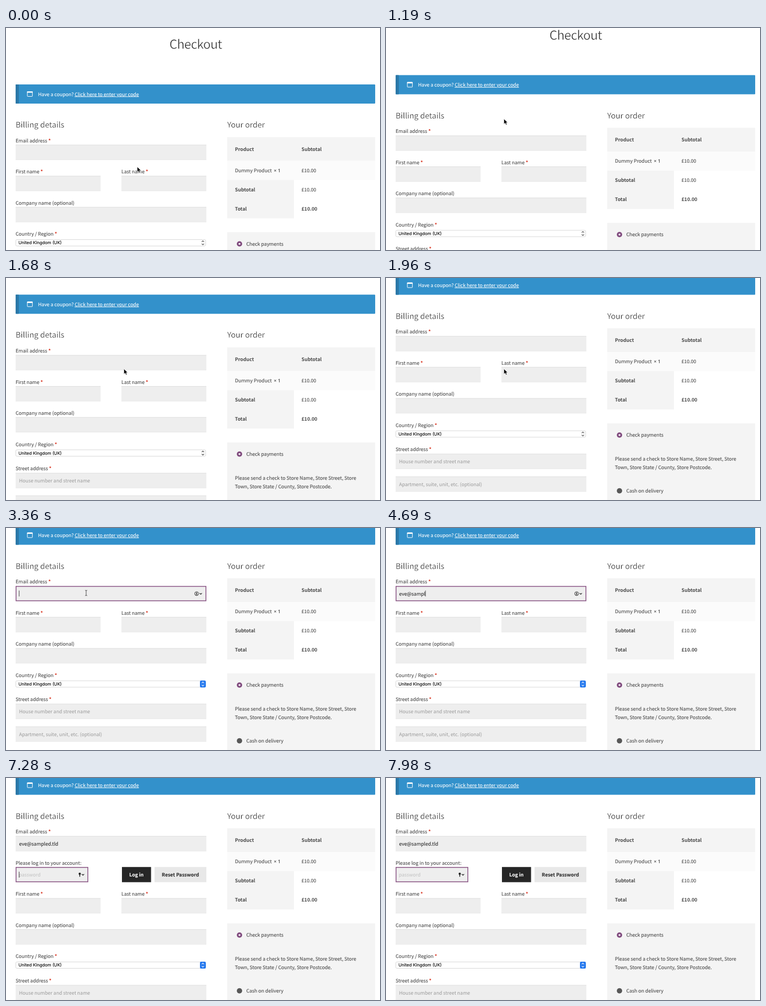
Write an HTML page that moves like this. It is 700 by 417 pixels and loops after 8 s.

```html
<!DOCTYPE html>
<html lang="en">
<head>
<meta charset="utf-8">
<title>Checkout</title>
<style>
  html, body { margin: 0; width: 100%; height: 100%; overflow: hidden; background: #fff; }
  svg { display: block; width: 100vw; height: 100vh; }
  text {
    font: 9.05px "Noto Sans CJK JP", "Noto Sans CJK SC", "Noto Sans CJK KR", "Noto Sans CJK", "Open Sans", sans-serif;
    fill: #4a4a4a; stroke: #4a4a4a; stroke-width: .1px;
    white-space: pre; text-rendering: geometricPrecision;
  }
  /* A white outline thins the regular weight to a light one. */
  .title, .heading { font-weight: 300; fill: #2c2c2c; stroke: #fff; }
  .title { font-size: 23.4px; letter-spacing: -.63px; stroke-width: .5px; }
  .heading { font-size: 14.5px; stroke-width: .32px; }
  .bold { font-weight: 600; stroke: none; }
  .white { fill: #fff; stroke: #fff; }
  .dark { fill: #2e2e2e; stroke: #2e2e2e; }
  .hint { fill: #999; stroke: none; }
  .pale { fill: #c0c0c0; stroke: none; }
  .required { fill: #d8301c; stroke: none; font-weight: 600; }
  .count { font-family: "Open Sans", sans-serif; font-size: 9px; }
  .system { font-family: Inter, "Liberation Sans", sans-serif; font-size: 8.1px; fill: #000; stroke: #000; }
  .focus { fill: none; stroke: #8a5585; stroke-width: 1.5; }
</style>
</head>
<body>
<svg id="stage" viewBox="0 0 700 417"></svg>
<script>
const DURATION = 8000, STEP = 70;
const FOCUS_EMAIL = 2870, FOCUS_NAME = 5740, FOCUS_PASSWORD = 7000;
const EMAIL = "eve@sampled.tld";
const KEY_TIMES = [3500, 3640, 3780, 4060, 4200, 4270, 4480, 4550, 4620, 4830, 4900, 5040, 5110, 5250, 5390];
const SCROLL = [[1050, 0], [1190, 17.5], [1680, 74.7], [1960, 110.5]];
const LOGIN_HEIGHT = 58.5, FIELD_HEIGHT = 28.5;

const rect = (x, y, w, h, fill, extra = "") =>
  `<rect x="${x}" y="${y}" width="${w}" height="${h}" fill="${fill}" ${extra}/>`;
const text = (x, y, content, cls = "", extra = "") =>
  `<text x="${x}" y="${y}" class="${cls}" ${extra}>${content}</text>`;
const label = (x, y, content) =>
  text(x, y, `${content} <tspan class="required">*</tspan>`);
const field = (x, y, w) =>
  rect(x, y, w, FIELD_HEIGHT, "#eee") + rect(x, y, w, .8, "#dcdcdc") +
  rect(x, y + FIELD_HEIGHT - .5, w, .5, "#e2e2e2");
const focusRing = (x, y, w) =>
  `<rect x="${x + .75}" y="${y + .75}" width="${w - 1.5}" height="${FIELD_HEIGHT - 1.5}" class="focus"/>`;
const button = (x, w, fill, caption, cls) =>
  rect(x, 277.7, w, FIELD_HEIGHT, fill) +
  text(x + w / 2, 295.5, caption, `bold ${cls}`, 'text-anchor="middle"');
const chevron = (x, y) =>
  `<path d="M${x - 2.2} ${y - 1}l2.2 2.2 2.2-2.2" fill="none" stroke="#222" stroke-width="1.2"/>`;
const personIcon = (x, y) => `
  <circle cx="${x}" cy="${y}" r="3.6" fill="none" stroke="#222" stroke-width=".9"/>
  <circle cx="${x}" cy="${y - .9}" r="1.2" fill="#222"/>
  <path d="M${x - 2.1} ${y + 2.1}q2.1-2.4 4.2 0z" fill="#222"/>${chevron(x + 7.7, y)}`;
const keyIcon = (x, y) => `
  <circle cx="${x}" cy="${y - 1.6}" r="2.1" fill="#222"/>
  ${rect(x - .7, y, 1.5, 4, "#222")}${chevron(x + 6, y)}`;
const arrows = color => `
  <path d="M366.4 401.9l2.1-2.2 2.1 2.2M366.4 405.1l2.1 2.2 2.1-2.2" fill="none" stroke="${color}" stroke-width="1.1"/>`;

const banner = `
  ${rect(18, 106, 673, 36, "#3391cb", 'rx="1.3"')}
  ${rect(18, 106, 6, 36, "#2b78a8", 'rx="1"')}
  <rect x="40" y="119.5" width="9.4" height="9" fill="none" stroke="#fff" rx=".6"/>
  ${rect(39.5, 119, 10.4, 2.6, "#fff", 'rx=".6"')}
  ${text(60, 127.5, "Have a coupon?", "white")}
  ${text(128.5, 127.5, "Click here to enter your code", "white", 'text-decoration="underline"')}`;

const loginRow = `
  <g clip-path="url(#loginClip)">
    ${text(18, 273.5, "Please log in to your account:")}
    ${field(18, 277.7, 136)}${text(24, 295.5, "password", "pale")}
    ${button(217, 54.5, "#262626", "Log in", "white")}
    ${button(278, 97, "#e8e8e8", "Reset Password", "dark")}
    <g id="passwordFocus">${focusRing(18, 277.7, 136)}${keyIcon(138, 292)}</g>
  </g>`;

const lowerForm = `
  <g id="lower">
    ${label(18, 273.4, "First name")}${field(18, 277.7, 159)}
    ${label(216, 273.4, "Last name")}${field(216, 277.7, 159)}
    <g id="nameFocus">${focusRing(18, 277.7, 159)}${personIcon(159, 292)}</g>
    ${text(18, 331.8, "Company name (optional)")}${field(18, 336.2, 357)}
    ${label(18, 390.3, "Country / Region")}
    ${rect(18.3, 397.5, 355.4, 12, "#fff", 'rx="2.2" stroke="#c8c8c8" stroke-width=".7"')}
    ${text(23.2, 406.3, "United Kingdom (UK)", "system")}
    <g id="selectIdle">${arrows("#444")}</g>
    <g id="selectActive">${rect(363, 397, 11, 13, "#2478ee", 'rx="2.2"')}${arrows("#fff")}</g>
    ${label(18, 435.9, "Street address")}
    ${field(18, 440.8, 357)}${text(24.5, 458.5, "House number and street name", "hint")}
    ${field(18, 483.3, 357)}${text(24.5, 501, "Apartment, suite, unit, etc. (optional)", "hint")}
  </g>`;

const order = `
  ${text(414, 187.2, "Your order", "heading")}
  ${rect(414, 205, 277, 44.5, "#f4f4f4")}
  ${rect(414, 249.5, 277, 36, "#fbfbfb")}
  ${rect(414, 285.5, 125, 72, "#f4f4f4")}
  ${text(428.5, 230.8, "Product", "bold")}${text(553, 230.8, "Subtotal", "bold")}
  ${text(428.5, 270.6, "Dummy Product")}${text(501.3, 270.6, "× 1", "bold count")}${text(553, 270.6, "£10.00")}
  ${text(428.5, 306.6, "Subtotal", "bold")}${text(553, 306.6, "£10.00")}
  ${text(428.5, 342.5, "Total", "bold")}${text(553, 342.5, "£10.00", "bold")}
  ${rect(414, 383.5, 277, 180, "#f4f4f4")}
  <circle cx="437" cy="405.5" r="5" fill="#814c7f"/><circle cx="437" cy="405.5" r="1.8" fill="#fff"/>
  ${text(449.7, 408.9, "Check payments")}
  ${text(428.5, 453.7, "Please send a check to Store Name, Store Street, Store")}
  ${text(428.5, 469.6, "Town, Store State / County, Store Postcode.")}
  <circle cx="437" cy="510.3" r="5" fill="#585858"/>
  ${text(449.7, 513.7, "Cash on delivery")}
  <g id="cover">${rect(413, 204, 279, 154, "#fff")}${rect(413, 383, 279, 181, "#fff")}</g>
  <g id="spinner">${Array.from({ length: 8 }, (_, i) =>
    `<circle cy="-8" r="1.9" fill="#777" opacity="${1 - i * .08}" transform="rotate(${-45 * i})"/>`).join("")}</g>`;

document.getElementById("stage").innerHTML = `
  <clipPath id="loginClip"><rect id="loginReveal" x="0" y="262" width="400" height="0"/></clipPath>
  <g id="page">
    ${text(355, 39.2, "Checkout", "title", 'text-anchor="middle"')}
    ${banner}
    ${text(18, 187.2, "Billing details", "heading")}
    ${label(18, 214.9, "Email address")}${field(18, 219.4, 357)}
    ${rect(18, 219.4, 1.5, FIELD_HEIGHT, "#1b8454", 'id="valid"')}
    <g id="emailFocus">${focusRing(18, 219.4, 357)}${personIcon(356.8, 233.8)}</g>
    ${text(24.5, 237.2, "", "dark", 'id="email"')}
    ${loginRow}${lowerForm}${order}
    ${rect(0, 0, .8, 11, "#222", 'id="caret"')}
  </g>
  <path id="pointer" d="M0 0V9.8L2.3 7.7 3.9 11.3 5.7 10.5 4.1 7H7.2Z" fill="#000" stroke="#fff" stroke-width=".7"/>
  <path id="beam" d="M-2-5Q0-5 0-4Q0-5 2-5M0-4V4M-2 5Q0 5 0 4Q0 5 2 5" fill="none" stroke="#222" stroke-width=".8"/>`;

const el = {};
document.querySelectorAll("#stage [id]").forEach(node => el[node.id] = node);

const clamp = v => Math.max(0, Math.min(1, v));
const ramp = (t, from, to) => clamp((t - from) / (to - from));
const ease = v => .5 - Math.cos(Math.PI * v) / 2;
const mix = (a, b, v) => a + (b - a) * v;
const show = (node, on) => node.setAttribute("visibility", on ? "visible" : "hidden");
const move = (node, x, y, extra = "") => node.setAttribute("transform", `translate(${x} ${y}) ${extra}`);

function along(keys, t) {
  if (t <= keys[0][0]) return keys[0][1];
  for (let i = 1; i < keys.length; i++) {
    const [t0, a] = keys[i - 1], [t1, b] = keys[i];
    if (t <= t1) return mix(a, b, ramp(t, t0, t1));
  }
  return keys[keys.length - 1][1];
}

function drawCaret(t, lastKey) {
  const inEmail = t < FOCUS_NAME, inPassword = t >= FOCUS_PASSWORD;
  const start = inEmail ? Math.max(FOCUS_EMAIL, lastKey) : inPassword ? FOCUS_PASSWORD : FOCUS_NAME;
  const typedWidth = inEmail && el.email.textContent ? el.email.getComputedTextLength() : 0;
  show(el.caret, t >= FOCUS_EMAIL && (t - start) % 1000 < 500);
  move(el.caret, 24.3 + typedWidth, inEmail ? 228 : 286.5);
}

function drawCursor(t) {
  const first = ease(ramp(t, 0, 910)), second = ease(ramp(t, 1960, 2700));
  const x = mix(mix(245.6, 220.7, first), 150, second);
  const y = mix(mix(260.8, 170.8, first), 122, second);
  move(el.pointer, x, y);
  move(el.beam, x, y);
  show(el.pointer, t < 2730);
  show(el.beam, t >= 2730 && t < KEY_TIMES[0]);
}

function render(t) {
  move(el.page, 0, -along(SCROLL, t));

  const typed = KEY_TIMES.filter(k => k <= t).length;
  el.email.textContent = EMAIL.slice(0, typed);
  show(el.emailFocus, t >= FOCUS_EMAIL && t < FOCUS_NAME);
  show(el.valid, t >= FOCUS_NAME && t < FOCUS_PASSWORD);
  show(el.nameFocus, t >= FOCUS_NAME && t < FOCUS_PASSWORD);
  show(el.passwordFocus, t >= FOCUS_PASSWORD);
  show(el.selectIdle, t < 2730);
  show(el.selectActive, t >= 2730);

  const reveal = LOGIN_HEIGHT * ease(ramp(t, 6720, 7000));
  el.loginReveal.setAttribute("height", reveal);
  move(el.lower, 0, reveal);

  const blocked = ramp(t, 5740, 5950) - ramp(t, 7000, 7210);
  el.cover.setAttribute("opacity", .6 * blocked);
  el.spinner.setAttribute("opacity", blocked);
  const turn = ease(((t - FOCUS_NAME + DURATION) % 1000) / 1000) * 360;
  move(el.spinner, 552.5, 281.7, `rotate(${turn})`);

  drawCaret(t, typed ? KEY_TIMES[typed - 1] : 0);
  drawCursor(t);
}

const origin = performance.now();
function tick() {
  const t = (performance.now() - origin) % DURATION;
  render(Math.floor(t / STEP) * STEP);
  requestAnimationFrame(tick);
}
tick();
</script>
</body>
</html>
```
